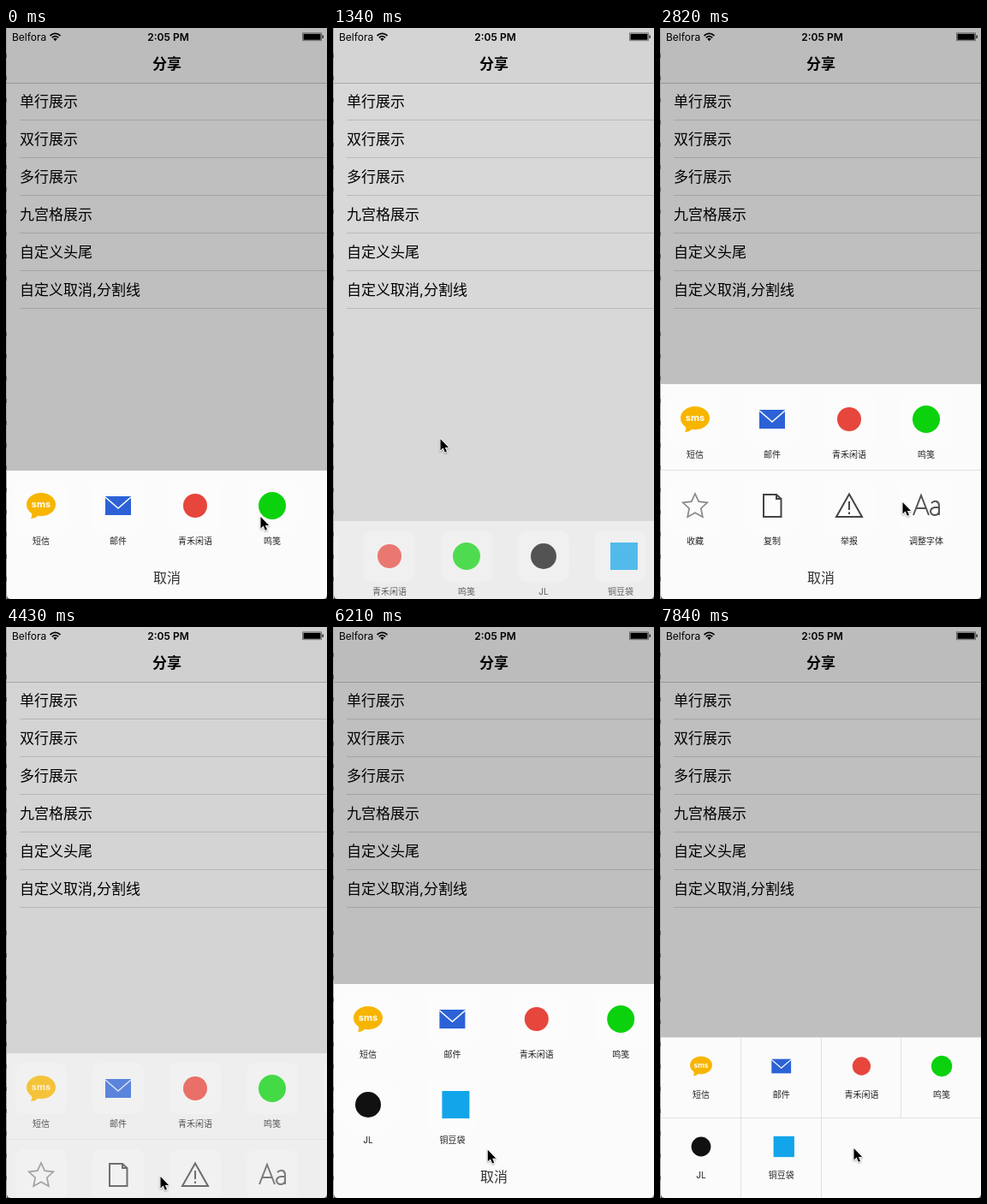
These frames come from a looping animation (375 by 667 pixels, 7990 ms). An HTML page with a canvas:

```html
<!DOCTYPE html>
<html lang="zh-CN">
<head>
<meta charset="utf-8">
<style>
html, body { margin: 0; width: 100%; height: 100%; overflow: hidden; background: #fff; }
canvas { display: block; width: 375px; height: 667px; }
</style>
</head>
<body>
<canvas id="stage"></canvas>
<script>
const W = 375, H = 667, MID = 188, LOOP = 7990, TICK = 147.4, SLIDE = 2.2;
const canvas = document.getElementById('stage');
const dpr = window.devicePixelRatio || 1;
canvas.width = W * dpr;
canvas.height = H * dpr;
const c = canvas.getContext('2d');

const clamp = x => Math.min(1, Math.max(0, x));
const ease = x => (x = clamp(x), x * x * (3 - 2 * x));
const mix = (a, b, u) => a + (b - a) * u;

function rect(x, y, w, h, color) {
  c.fillStyle = color;
  c.fillRect(x, y, w, h);
}

function text(s, x, y, size, { weight = 400, color = '#000', align = 'center' } = {}) {
  c.font = `${weight} ${size}px Inter, "Noto Sans CJK SC", "Noto Sans CJK", sans-serif`;
  c.textAlign = align;
  c.fillStyle = color;
  c.fillText(s, x, y + size * 0.38);
}

function stroke(d, color, width) {
  c.strokeStyle = color;
  c.lineWidth = width;
  c.stroke(new Path2D(d));
}

function fill(d, color) {
  c.fillStyle = color;
  c.fill(new Path2D(d));
}

function disc(r, color) {
  c.fillStyle = color;
  c.beginPath();
  c.arc(0, 0, r, 0, 7);
  c.fill();
}

function star() {
  let d = '';
  for (let i = 0; i < 10; i++) {
    const a = i * Math.PI / 5, r = i % 2 ? 7.2 : 15;
    d += (i ? 'L' : 'M') + r * Math.sin(a) + ' ' + (1 - r * Math.cos(a));
  }
  stroke(d + 'Z', '#888', 1.7);
}

function sms() {
  fill('M-17 -1.5A17 13.5 0 0 1 17 -1.5A17 13.5 0 0 1 -4 11.8Q-7 15 -12 15Q-10 12 -11 9Q-17 5 -17 -1.5Z', '#f7b500');
  text('sms', 0, -2, 11, { weight: 700, color: '#fff' });
}

function mail() {
  rect(-15, -11, 30, 22, '#2c62d6');
  stroke('M-15 -10L0 3L15 -10', '#fff', 1.6);
}

function report() {
  stroke('M0 -13.5L15 13H-15Z', '#444', 2);
  stroke('M0 -5V5M0 7.5V10', '#444', 2);
}

const share = [
  ['短信', sms],
  ['邮件', mail],
  ['青禾闲语', () => disc(14, '#e6463c')],
  ['鸣笺', () => disc(16, '#0bd20d')],
  ['JL', () => disc(15, '#111')],
  ['铜豆袋', () => rect(-12, -16, 32, 32, '#12a5ea')]
];
const tools = [
  ['收藏', star],
  ['复制', () => stroke('M-10 -13H5L10.5 -8V13H-10ZM5 -13V-8H10.5', '#444', 2)],
  ['举报', report],
  ['调整字体', () => stroke('M-15 11L-6 -12L3 11M-12 3H0M6 -3Q9 -6 12 -5Q15 -4 15 0V11M15 2H10Q5 3 5 7Q6 11 10 11Q14 11 15 7', '#555', 2)]
];

function item([label, icon], x, y, scale = 1, drop = 41) {
  c.save();
  c.translate(x, y);
  if (scale === 1) {
    c.fillStyle = 'rgba(255,255,255,.25)';
    c.beginPath();
    c.roundRect(-30, -30, 60, 60, 10);
    c.fill();
  }
  c.scale(scale, scale);
  icon();
  c.restore();
  text(label, x, y + drop, 10, { color: '#222' });
}

const row = (list, y, dx = 0) => list.forEach((it, i) => item(it, 41 + 90 * i - dx, y));
const cancel = y => text('取消', MID, y, 16, { color: '#333' });

// Times are in ticks; cell is the list row that opens the sheet
const sheets = [
  { open: -9, close: 8.06, h: 150, draw(k) {
    row(share, 41, 155 * ease((k - 1) / 7));
    cancel(125);
  } },
  { open: 12.6, close: 29.16, h: 251, cell: 1, draw() {
    row(share, 41);
    rect(1, 100, 374, 1, '#e0e0e0');
    row(tools, 142);
    cancel(226);
  } },
  { open: 36.34, close: 43.5, h: 250, cell: 2, draw() {
    share.forEach((it, i) => item(it, 41 + 98.4 * (i % 4), 41 + 100 * (i >> 2)));
    cancel(225);
  } },
  { open: 48.4, close: 99, h: 188, cell: 3, draw() {
    share.forEach((it, i) => {
      const x = i % 4, y = i >> 2;
      item(it, 48 + 93.7 * x, 34 + 94 * y, 0.76, 33);
      if (x < 3) rect(Math.round(94 + 93.6 * x), 94 * y, 1, 94, '#e2e2e2');
    });
    for (const y of [0, 94]) rect(1, y, 374, 1, '#e2e2e2');
  } }
];

// Pointer stops: x, y, arrival, departure
const stops = [
  [297, 571, 0, 1],
  [143, 558, 8, 8],
  [125, 480, 9, 9],
  [95, 128, 12, 12.6],
  [334, 508, 16, 16],
  [283, 554, 19, 19],
  [300, 588, 24, 24],
  [180, 642, 28, 30],
  [78, 155, 32, 32],
  [63, 168, 34, 36.4],
  [188, 640, 43, 43.5],
  [79, 226, 47, 48.4],
  [226, 609, 53, 54]
];

function pointerAt(k) {
  const i = stops.findLastIndex(s => s[2] <= k);
  const [x, y, , leave] = stops[i];
  const [nx, ny, arrive] = stops[i + 1] || stops[i];
  const u = k > leave ? ease((k - leave) / (arrive - leave)) : 0;
  return [mix(x, nx, u), mix(y, ny, u)];
}

const cells = ['单行展示', '双行展示', '多行展示', '九宫格展示', '自定义头尾', '自定义取消,分割线'];

function statusBar() {
  text('Belfora', 7, 10, 12, { align: 'left' });
  text('2:05 PM', 189.5, 10, 12, { weight: 600 });
  stroke('M51.5 9Q57.5 3.8 63.5 9M53.8 11.3Q57.5 8 61.2 11.3', '#000', 1.7);
  fill('M57.5 15.2L55.2 12.7Q57.5 10.9 59.8 12.7Z', '#000');
  stroke('M346.5 5.8H368.5V14.7H346.5Z', '#444', 0.6);
  rect(347.5, 6.8, 20, 7, '#000');
  rect(369.5, 8.5, 1.2, 3.5, '#000');
}

function page(k) {
  rect(0, 0, W, H, '#fff');
  rect(0, 0, W, 64, '#fafafa');
  statusBar();
  text('分享', MID, 42, 17, { weight: 600 });
  rect(0, 64, W, 1, '#c8c8c8');
  for (const s of sheets) {
    if (!s.cell || k < s.open) continue;
    c.globalAlpha = 1 - ease(k - s.open - 1);
    rect(0, 63 + 44 * s.cell, W, 45, '#d9d9d9');
    c.globalAlpha = 1;
  }
  cells.forEach((s, i) => {
    text(s, 16, 86 + 44 * i, 17, { align: 'left' });
    rect(16, 107 + 44 * i, W, 1, '#dbdbdd');
  });
}

function drawSheet(s, k) {
  const gone = ease((k - s.close) / SLIDE);
  if (k < s.open || gone >= 1) return;
  const hidden = 1 - ease((k - s.open) / SLIDE) + gone;
  rect(0, 0, W, H, `rgba(0,0,0,${0.25 * (1 - gone)})`);
  c.save();
  c.translate(0, Math.round(H - s.h + s.h * hidden));
  c.globalAlpha = 1 - gone;
  rect(0, 0, W, s.h, '#fbfbfb');
  c.globalAlpha = (1 - gone) ** 0.7;
  s.draw(k);
  c.restore();
}

function windowEdge() {
  rect(0, 0, 1, H, '#a8a8a8');
  for (let y = 30; y < H; y += 13) {
    if (Math.sin(y * 1.7) > 0.1) rect(0, y, 1, 5, '#686870');
  }
  fill('M1 662V667H6Q1 667 1 662ZM375 662V667H370Q375 667 375 662Z', '#555');
}

function drawPointer(x, y) {
  const arrow = 'M0 0V15L3.5 11.8L6 17.5L8.3 16.5L6 11H10.7Z';
  c.save();
  c.translate(x + 0.5, y);
  c.scale(0.9, 0.9);
  c.lineJoin = 'round';
  c.shadowColor = 'rgba(0,0,0,.35)';
  c.shadowBlur = 2 * dpr;
  c.shadowOffsetY = dpr;
  stroke(arrow, '#fff', 2);
  c.shadowColor = 'transparent';
  fill(arrow, '#000');
  c.restore();
}

function frame() {
  // The picture moves in steady steps
  const k = Math.min(53, Math.floor(performance.now() % LOOP / TICK));
  c.setTransform(dpr, 0, 0, dpr, 0, 0);
  page(k);
  sheets.forEach(s => drawSheet(s, k));
  windowEdge();
  drawPointer(...pointerAt(k));
  requestAnimationFrame(frame);
}
frame();
</script>
</body>
</html>
```
